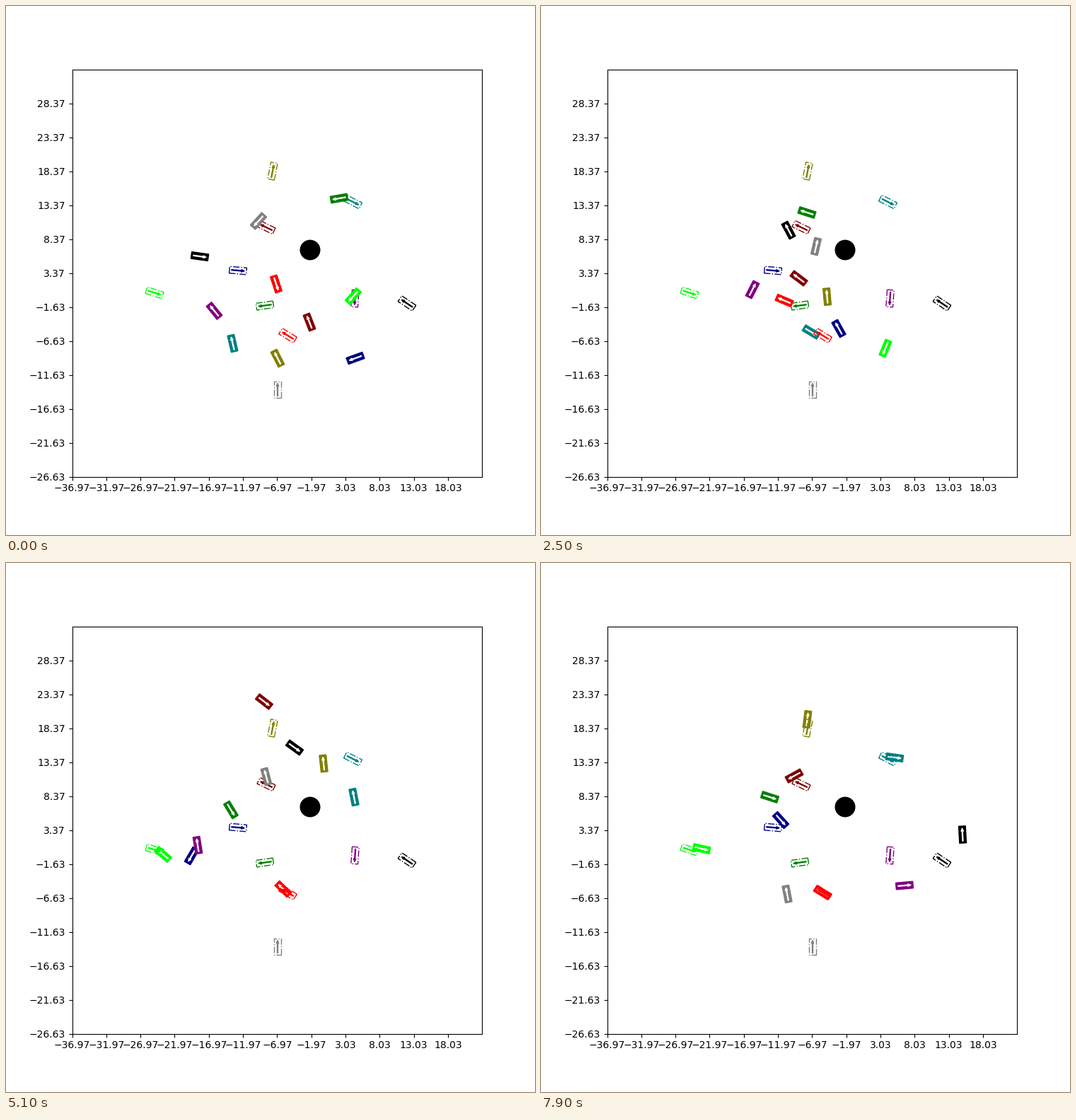
A matplotlib script that plays this animation: 748 px wide and 748 px high, repeating every 8000 ms.

```python
import numpy as np
import matplotlib.pyplot as plt
from matplotlib.animation import FuncAnimation
from matplotlib.patches import Circle, FancyArrow, Rectangle
from matplotlib.transforms import Affine2D

SIZE, DPI = 748, 100
FRAMES, STEP_MS = 80, 100
X0, Y0, SPAN = -36.97, -26.63, 60
LENGTH, WIDTH = 2.5, 1.0

# Frames at which every car has a known pose
KEYS = np.array([1, 16, 25, 39, 51, 59, 79])

# Car centres at the key frames, in stage pixels, in drawing order
PATHS = {
    "black": [(274, 354), (318, 357), (350, 317), (263, 218.5), (408, 261), (463, 372), (596, 384)],
    "navy": [(494, 498), (456, 483), (421, 456), (361.5, 385), (262.5, 414), (293, 470), (339, 363.5)],
    "teal": [(320.5, 477), (338, 450), (382, 461), (442, 430), (492, 331), (469.5, 276), (500, 275)],
    "maroon": [(429, 447), (416.5, 407), (364.5, 385), (314, 294), (365, 196), (365, 279), (358, 301)],
    "olive": [(384, 498), (391, 457), (404.5, 411), (356, 341), (449, 283.5), (402, 248), (376.5, 221)],
    "gray": [(357, 304), (355, 345), (389, 340), (372, 309), (368, 302), (368.5, 324), (348, 468)],
    "purple": [(294.5, 431), (294, 429), (299, 401), (337, 342), (271, 399), (342, 433), (514, 456)],
    "lime": [(491, 410.5), (457.5, 437), (487, 484), (362, 476), (222, 412), (171, 411), (227, 404)],
    "green": [(471, 272), (431.5, 281), (376, 292), (275, 222), (318, 349), (379, 419), (323.5, 331)],
    "red": [(382, 393), (368, 424), (344, 416.5), (358, 424.5), (392, 461), (399, 467), (398, 466)],
}

# Headings in degrees at the key frames, unwrapped
TURNS = {
    "black": [-8, 0, 118, 50, -36, -53, 93],
    "navy": [200, 125, 119, 173, 240, 414, 312],
    "teal": [103, 0, -31, 66, 101, 55, -8],
    "maroon": [111, 128, 143, 86, -38, -139, -151],
    "olive": [117, 52, 95, 67, 96, 216, 83],
    "gray": [228, 317, 437, 481, 465, 443, 461],
    "purple": [129, 112, 63, -44, -261, -338, -355],
    "lime": [228, 264, 248, 151, 140, 121, -13],
    "green": [190, 167, 162, 29, -59, -76, -18],
    "red": [288, 185, 157, 150, 136, 148, 148],
}

# Parking place of each car: centre and heading
GOALS = {
    "black": (567, 420.5, 146),
    "navy": (328, 374, -5),
    "teal": (490.5, 277, -27),
    "maroon": (368, 313, 154),
    "olive": (377, 233.5, 79),
    "gray": (384, 542.5, 90),
    "purple": (493.5, 413.5, 266),
    "lime": (210, 405.5, -18),
    "green": (366, 423.5, 188),
    "red": (398.5, 466, 148),
}

fig, ax = plt.subplots(figsize=(SIZE / DPI, SIZE / DPI), dpi=DPI)
ax.set_xlim(X0, X0 + SPAN)
ax.set_ylim(Y0, Y0 + SPAN)
ax.set_xticks(np.arange(X0, X0 + SPAN - 1, 5))
ax.set_yticks(np.arange(Y0, Y0 + SPAN - 1, 5))
ax.set_xlim(X0, X0 + SPAN)
ax.set_ylim(Y0, Y0 + SPAN)


def to_data(points):
    """Stage pixels (y down) to axes units."""
    p = np.array(points, float)
    p[..., 1] = SIZE - p[..., 1]
    return ax.transData.inverted().transform(p)


def place(parts, centre, heading):
    move = Affine2D().rotate_deg(heading).translate(*centre)
    for part in parts:
        part.set_transform(move + ax.transData)


def make_box(color, filled):
    """Rectangle with an arrow along its length, centred on the origin."""
    box = Rectangle((-LENGTH / 2, -WIDTH / 2), LENGTH, WIDTH, lw=1, ec=color,
                    fc=color if filled else "none", ls="-" if filled else "-.")
    ink = "white" if filled else color
    arrow = FancyArrow(-0.95, 0, 1.9, 0, width=0.1, head_width=0.36, head_length=0.45,
                       length_includes_head=True, fc=ink, ec=ink, lw=1)
    for part in (box, arrow):
        ax.add_artist(part)
    return box, arrow


class Car:
    def __init__(self, color):
        self.parts = make_box(color, True)
        self.xy = to_data(PATHS[color])
        self.turn = np.array(TURNS[color], float)
        # Cars roll only along their heading, forwards or backwards
        a = np.radians(self.turn)
        ahead = np.column_stack([np.cos(a), np.sin(a)])
        speed = (np.gradient(self.xy, KEYS, axis=0) * ahead).sum(axis=1)
        self.vel = ahead * speed[:, None]

    def pose(self, t):
        i = min(np.searchsorted(KEYS, t, side="right") - 1, len(KEYS) - 2)
        span = KEYS[i + 1] - KEYS[i]
        s = (t - KEYS[i]) / span
        blend = s * s * (3 - 2 * s)
        xy = (self.xy[i] * (1 - blend) + self.xy[i + 1] * blend
              + span * s * (1 - s) * ((1 - s) * self.vel[i] - s * self.vel[i + 1]))
        return xy, np.interp(t, KEYS, self.turn)


ax.add_artist(Circle(to_data((430, 345)), 1.5, fc="black", ec="none"))

cars = []
for name in PATHS:
    cars.append(Car(name))
    gx, gy, angle = GOALS[name]
    place(make_box(name, False), to_data((gx, gy)), angle)


def update(n):
    t = max(n, KEYS[0])
    for car in cars:
        place(car.parts, *car.pose(t))
    return [part for car in cars for part in car.parts]


anim = FuncAnimation(fig, update, frames=FRAMES, interval=STEP_MS, repeat=True,
                     repeat_delay=0, init_func=lambda: update(0))
plt.show()
```
